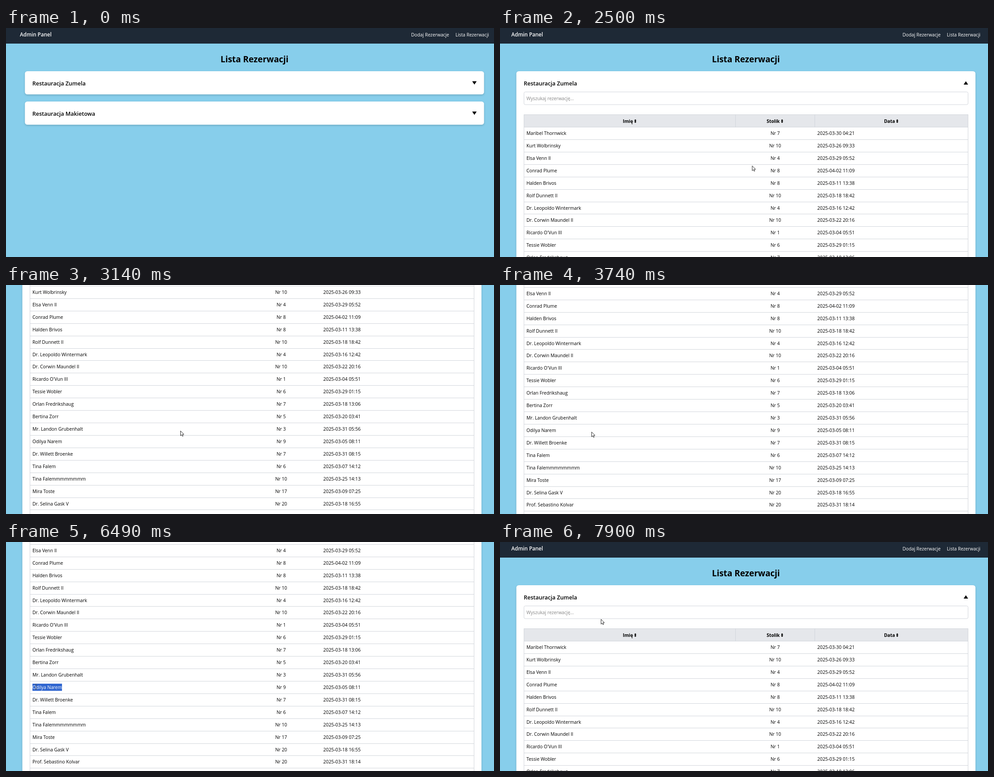
These frames come from a looping animation (1089x514 px, 8000 ms). An HTML page with a canvas:

```html
<!DOCTYPE html>
<html lang="pl">
<head>
<meta charset="utf-8">
<title>Lista Rezerwacji</title>
<style>
  html, body { margin: 0; width: 100%; height: 100%; overflow: hidden; background: #87ceeb; }
  canvas { display: block; }
</style>
</head>
<body>
<canvas id="stage" width="1089" height="514"></canvas>
<script>
const ctx = document.getElementById('stage').getContext('2d');
const W = 1089, H = 514, LOOP = 8000;
const OPEN_AT = 1730, ROW = 27.92, SELECTED_ROW = 13;
const LINE = '#d1d5db';

const rows = `Maribel Thornwick|7|03-30 04:21
Kurt Wolbrinsky|10|03-26 09:33
Elsa Venn II|4|03-29 05:52
Conrad Plume|8|04-02 11:09
Halden Brivos|8|03-11 13:38
Rolf Dunnett II|10|03-18 18:42
Dr. Leopoldo Wintermark|4|03-16 12:42
Dr. Corwin Maundel II|10|03-22 20:16
Ricardo O'Vun III|1|03-04 05:51
Tessie Wobler|6|03-29 01:15
Orlan Fredrikshaug|7|03-18 13:06
Bertina Zorr|5|03-20 03:41
Mr. Landon Grubenhalt|3|03-31 05:56
Odilya Narem|9|03-05 08:11
Dr. Willett Broenke|7|03-31 08:15
Tina Falem|6|03-07 14:12
Tina Falemmmmmmmm|10|03-25 14:13
Mira Toste|17|03-09 07:25
Dr. Selina Gask V|20|03-18 16:55
Prof. Sebastino Kolvar|20|03-31 18:14`.split('\n').map(r => r.split('|'));

// Tracks: [time, value, ...]
const scrollTrack = [[2560, 0], [2800, 108], [3140, 248], [3215, 272.5], [6800, 272.5], [7330, 0]];
const cursorTrack = [
  [40, 1082, 512], [250, 1034, 225], [390, 1034, 224], [800, 1027, 160], [1180, 1031, 117],
  [1280, 1031, 117], [1470, 1041, 115], [1860, 1041, 115], [2180, 640, 300], [2380, 640, 300],
  [2700, 398, 328], [2800, 398, 328], [3140, 389, 327], [3200, 389, 327], [3970, 154, 330],
  [4070, 154, 331], [4860, 117, 331], [4890, 117, 331], [5020, 94, 328], [5500, 66, 325],
  [5700, 66, 324], [6000, 59, 323], [6490, 67, 325], [6590, 67, 325], [6850, 309, 320],
  [7470, 309, 320], [7860, 225, 173]
];
const selectTrack = [[4890, 0], [5020, 4], [5500, 12]];

const smooth = u => u * u * (3 - 2 * u);

function sample(track, t, ease = u => u) {
  if (t <= track[0][0]) return track[0].slice(1);
  const i = track.findIndex(k => k[0] > t);
  if (i < 0) return track[track.length - 1].slice(1);
  const a = track[i - 1], b = track[i];
  const u = ease((t - a[0]) / (b[0] - a[0]));
  return a.slice(1).map((v, n) => v + (b[n + 1] - v) * u);
}

function text(str, x, y, { size = 10.3, weight = 400, color = '#000', align = 'left' } = {}) {
  ctx.font = `${weight} ${size}px "Open Sans", "Noto Sans", sans-serif`;
  ctx.fillStyle = color;
  ctx.textAlign = align;
  ctx.fillText(str, x, y);
}

function rect(x, y, w, h, color) {
  ctx.fillStyle = color;
  ctx.fillRect(x, y, w, h);
}

function card(x, y, h) {
  ctx.save();
  ctx.shadowColor = 'rgba(0,0,0,.17)';
  ctx.shadowBlur = 4;
  ctx.shadowOffsetY = 2;
  ctx.fillStyle = '#fff';
  ctx.beginPath();
  ctx.roundRect(x, y, 1024.5, h, 5.5);
  ctx.fill();
  ctx.restore();
}

function toggle(x, y, angle) {
  ctx.save();
  ctx.translate(x, y);
  ctx.rotate(angle);
  ctx.fillStyle = '#000';
  ctx.fill(new Path2D('M-5-3.7H5L0 3.7Z'));
  ctx.restore();
}

function sortIcon(x, y) {
  ctx.save();
  ctx.translate(x, y);
  ctx.fillStyle = '#000';
  ctx.fill(new Path2D('M0-4.3 2.6-1H1V1H2.6L0 4.3-2.6 1H-1V-1H-2.6Z'));
  ctx.restore();
}

function drawHeading(dx, s) {
  rect(0, -s, W, 35, '#1e2936');
  text('Admin Panel', 31 + dx, 19 - s, { size: 11.6, weight: 600, color: '#fff' });
  text('Dodaj Rezerwacje', 904 + dx, 18.5 - s, { color: '#fff' });
  text('Lista Rezerwacji', 1003 + dx, 18.5 - s, { size: 10.2, color: '#fff' });
  text('Lista Rezerwacji', 554.5 + dx, 77 - s, { size: 18.9, weight: 700, align: 'center' });
}

function drawSelection(name, top, count) {
  if (!count) return;
  const end = 59 + ctx.measureText(name).width;
  const start = 59 + ctx.measureText(name.slice(0, name.length - count)).width;
  ctx.save();
  ctx.beginPath();
  ctx.rect(start, top + 6, end - start, 16);
  ctx.clip();
  rect(start, top + 6, end - start, 16, '#3066d0');
  text(name, 59, top + 18, { color: '#fff' });
  ctx.restore();
}

function drawTable(s, selected) {
  ctx.lineWidth = 1;
  ctx.strokeStyle = LINE;
  ctx.beginPath();
  ctx.roundRect(53.5, 143.5 - s, 991, 28.5, 3);
  ctx.stroke();
  text('Wyszukaj rezerwację...', 59, 162 - s, { size: 10.2, color: '#858585' });

  const head = 194 - s;
  rect(53, head, 992, 28, '#e5e7eb');
  rect(53, head, 992, 1, LINE);
  [525, 702].forEach(x => rect(x, head, 1, 28, LINE));
  [['Imię', 274, 302], ['Stolik', 595, 629.5], ['Data', 857, 886.5]].forEach(([label, x, icon]) => {
    text(label, x, head + 18.5, { weight: 700 });
    sortIcon(icon, head + 15);
  });

  rows.forEach(([name, table, date], i) => {
    const top = Math.round(222 + i * ROW - s);
    rect(53, top, 992, 1, LINE);
    text('Nr ' + table, 614, top + 18, { align: 'center' });
    text('2025-' + date, 708, top + 18, { size: 10.4 });
    text(name, 59, top + 18);
    if (i === SELECTED_ROW) drawSelection(name, top, selected);
  });
  const bottom = Math.round(222 + rows.length * ROW - s);
  rect(53, bottom, 992, 1, LINE);
  [53, 1044].forEach(x => rect(x, head, 1, H - head, LINE));
}

const shapes = {
  arrow: new Path2D('M.5.5V11.3L3 9 4.7 12.6 6.4 11.8 4.8 8.2H8Z'),
  hand: new Path2D('M-1.3 1.3Q0-.5 1.3 1.3V5.6Q2.6 4.8 3.5 6 5 5.6 5.5 6.9 7 6.7 7 8.3V11Q6.8 13 5.6 15.5H-.8Q-2 13-4 10.5-4.6 8.5-3 8.8L-1.3 10Z'),
  fingers: new Path2D('M1.3 5.6V8M3.5 6V8.2M5.5 6.9V8.5'),
  beam: new Path2D('M-2.5-5.5H-.8L0-5 .8-5.5H2.5M0-5V5M-2.5 5.5H-.8L0 5 .8 5.5H2.5')
};

function drawCursor(t, open) {
  if (t < 40) return;
  const [x, y] = sample(cursorTrack, t, smooth);
  const overHeader = (y > 97 && y < 149) || (!open && y > 165 && y < 217);
  const pressed = (t >= 1690 && t < OPEN_AT) || (t >= 4890 && t < 6480);
  ctx.save();
  ctx.translate(x, y);
  ctx.lineWidth = .9;
  ctx.strokeStyle = '#111';
  ctx.fillStyle = '#fff';
  if (pressed) {
    ctx.fillStyle = 'rgba(255,242,20,.6)';
    ctx.beginPath();
    ctx.arc(0, 0, 8, 0, 7);
    ctx.fill();
    ctx.fillStyle = '#fff';
  }
  if (x < 124) {
    ctx.strokeStyle = '#555';
    ctx.stroke(shapes.beam);
  } else {
    const shape = overHeader ? shapes.hand : shapes.arrow;
    ctx.fill(shape);
    ctx.stroke(shape);
    if (overHeader) ctx.stroke(shapes.fingers);
  }
  ctx.restore();
}

function draw(t) {
  const open = t >= OPEN_AT;
  const dx = open ? -5.7 : 0;
  const s = Math.round(sample(scrollTrack, t)[0]);
  const turn = smooth(Math.min(1, Math.max(0, (t - OPEN_AT) / 200)));

  rect(0, 0, W, H, '#87ceeb');
  drawHeading(dx, s);
  card(42.2 + dx, 97 - s, open ? 900 : 52);
  text('Restauracja Zumela', 58.7 + dx, 129 - s, { size: 12.5, weight: 600 });
  toggle(1045.3 + dx, 123.2 - s, turn * Math.PI);
  if (open) {
    drawTable(s, Math.floor(sample(selectTrack, t)[0]));
  } else {
    card(42.2, 165, 52);
    text('Restauracja Makietowa', 58.7, 197, { size: 12.5, weight: 600 });
    toggle(1045.3, 191.2, 0);
  }
  drawCursor(t, open);
}

function tick() {
  draw(performance.now() % LOOP);
  requestAnimationFrame(tick);
}
tick();
</script>
</body>
</html>
```
